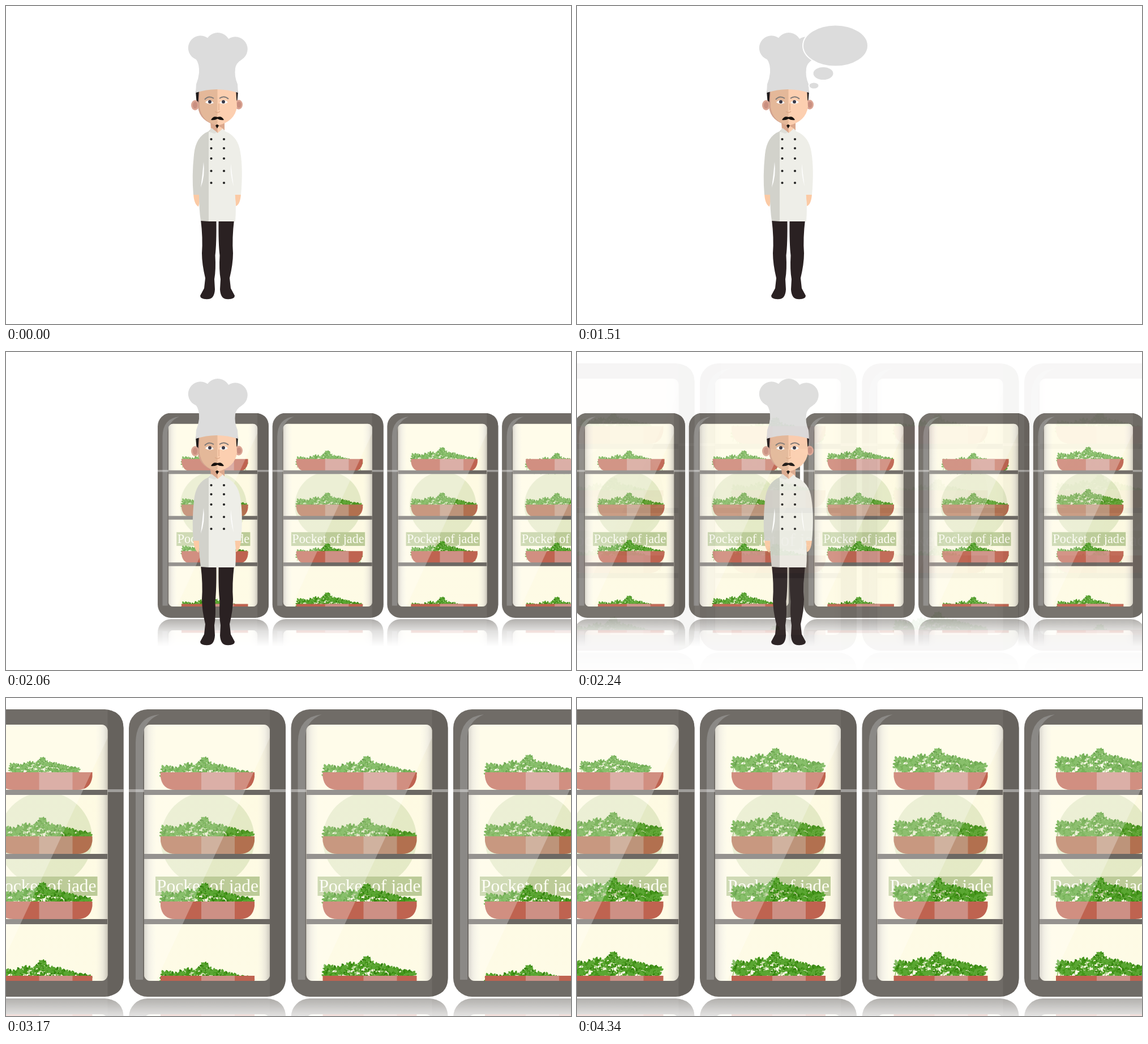
Write an HTML page that moves like this. It is 998 px wide and 561 px high and loops after 5.34 s.

```html
<!DOCTYPE html>
<html lang="en">
<head>
<meta charset="utf-8">
<title>Chef and growing cabinets</title>
<style>
@property --p { syntax: "<number>"; inherits: true; initial-value: 0; }
html, body { margin: 0; width: 100%; height: 100%; overflow: hidden; background: #fff; }
svg { display: block; width: 100vw; height: 100vh; }
.bubble, .dot, .slide, .near { animation: 5340ms linear infinite; }
.bubble { animation-name: bubble; }
.slide { animation-name: slide; }
.near { animation-name: fade, grow; }
.dot1 { animation-name: dot1; }
.dot2 { animation-name: dot2; }
.dot3 { animation-name: dot3; }
.plant { transform: translateY(max(0px, var(--d) - var(--d) * var(--p) * var(--s))); }
@keyframes bubble {
  0% { opacity: 0; animation-timing-function: step-end; }
  3.36% { opacity: 1; animation-timing-function: step-end; }
  30.7% { opacity: 1; animation-timing-function: steps(8); }
  35.195%, 100% { opacity: 0; }
}
@keyframes dot1 {
  0%, 15.72%, 28.265%, 100% { opacity: 0; animation-timing-function: step-end; }
  6.73%, 18.9% { opacity: 1; animation-timing-function: step-end; }
}
@keyframes dot2 {
  0%, 15.72%, 28.265%, 100% { opacity: 0; animation-timing-function: step-end; }
  8.415%, 21.335% { opacity: 1; animation-timing-function: step-end; }
}
@keyframes dot3 {
  0%, 15.72%, 28.265%, 100% { opacity: 0; animation-timing-function: step-end; }
  11.41%, 24.52% { opacity: 1; animation-timing-function: step-end; }
}
@keyframes slide {
  0% { transform: translateX(1100px); animation-timing-function: step-end; }
  31.262% { transform: translateX(977.5px); animation-timing-function: steps(18); }
  41.375%, 100% { transform: translateX(-5px); }
}
@keyframes fade {
  0%, 41.375% { opacity: 0; animation-timing-function: steps(17); }
  50.925%, 100% { opacity: 1; }
}
@keyframes grow {
  0%, 50.925% { --p: 0; animation-timing-function: steps(54); }
  81.262%, 100% { --p: 1; }
}
</style>
</head>
<body>
<svg viewBox="0 0 998 561" preserveAspectRatio="none">
  <defs>
    <linearGradient id="cream" x2="0" y2="1">
      <stop stop-color="#fefae1"/><stop offset="1" stop-color="#fefbe6"/>
    </linearGradient>
    <linearGradient id="edge">
      <stop stop-color="#b9b4ac" stop-opacity=".75"/>
      <stop offset=".035" stop-color="#dcd8d0" stop-opacity=".55"/>
      <stop offset=".1" stop-color="#f4f1e6" stop-opacity="0"/>
      <stop offset=".9" stop-color="#f4f1e6" stop-opacity="0"/>
      <stop offset=".965" stop-color="#dcd8d0" stop-opacity=".55"/>
      <stop offset="1" stop-color="#b9b4ac" stop-opacity=".75"/>
    </linearGradient>
    <linearGradient id="floor" gradientUnits="userSpaceOnUse" x1="0" y1="529" x2="0" y2="598">
      <stop stop-color="#fff" stop-opacity=".55"/>
      <stop offset=".45" stop-color="#fff" stop-opacity=".2"/>
      <stop offset="1" stop-color="#fff" stop-opacity="0"/>
    </linearGradient>
    <mask id="fadeout" maskUnits="userSpaceOnUse" x="-5" y="529" width="290" height="72">
      <rect x="-5" y="529" width="290" height="72" fill="url(#floor)"/>
    </mask>
    <clipPath id="inside"><rect x="27" y="47" width="222" height="452" rx="11"/></clipPath>

    <g id="case">
      <rect y="20" width="277" height="507" rx="33" fill="#706c67"/>
      <path d="M249 21Q277 25 277 53V494Q277 522 249 526Z" fill="#66625d"/>
      <path d="M12 497V78Q13 33 54 29Q27 40 25 68V497Z" fill="#8b8986"/>
      <rect x="27" y="47" width="222" height="452" rx="11" fill="url(#cream)"/>
      <rect x="27" y="47" width="222" height="452" rx="11" fill="url(#edge)"/>
    </g>
    <g id="pot">
      <path d="M0 0H166V8Q163 31 140 31H26Q3 31 0 8Z" fill="#bf6350"/>
      <path d="M72 0H131V31H72Z" fill="#cd9085"/>
    </g>
    <g id="sign">
      <circle cx="139" cy="249" r="83" fill="#7ea64c" opacity=".2"/>
      <rect x="47" y="315" width="184" height="34" fill="#bccb98"/>
      <text x="139" y="342" font-size="31.5" text-anchor="middle" fill="#fffef4"
        font-family="'Liberation Serif', serif">Pocket of jade</text>
    </g>
    <g id="glass">
      <path d="M27 162H249V171H27ZM27 275H249V284H27ZM27 390H249V399H27Z" fill="#6c6863"/>
      <path d="M27 47H249V70L48 499H27Z" fill="#fff" opacity=".28"/>
    </g>
    <g id="bush"></g>
  </defs>

  <rect width="998" height="561" fill="#fff"/>
  <g class="slide"><g id="far" transform="translate(0 93.24) scale(.7075 .713)"></g></g>

  <g id="chef">
    <path d="M344 377H371.500Q372 420 369.500 440Q371 465 368 482L369 500Q368 516 358 517Q343 518 343 511L350 498L352 480Q346 455 346 436Q348 410 344 377Z
      M375.500 377H403Q399 410 401 436Q401 455 395 480L397 498L404 511Q404 518 389 517Q379 516 378 500L379 482Q376 465 377.500 440Q375 420 375.500 377Z" fill="#2a2122"/>
    <path d="M331 331H342Q342 348 340 354Q332 350 331 331ZM404 331H415Q414 350 406 353Z" fill="#fbcaa5"/>
    <path d="M361 204H386V219L374 226L362 219Z" fill="#dba88d"/>
    <path d="M373 210L383 216L374 225Z" fill="#fccfb0"/>

    <path d="M363 216L374 224L383 216L387 221Q410 230 414 258Q419 288 415 333H404.500Q407 355 405 380H358V220Z" fill="#eeeee8"/>
    <path d="M363 216L358 221Q335 230 332 262Q328 300 331 333H341Q341 360 344 379L358 380V222L370 222Z" fill="#d2d2cb"/>
    <path d="M363 215L359 222L368 225L373 223Z" fill="#dfdfd9"/>
    <path d="M349 275Q352 300 344 320Q347 298 349 275ZM397 278Q396 298 402 318Q399 296 397 278Z" fill="#fff"/>
    <g id="buttons" fill="#222"></g>

    <path d="M335 150H342V172L337 174ZM404 150H410L408 174L404 172Z" fill="#1e1a1b"/>
    <ellipse cx="334" cy="175" rx="7" ry="9" fill="#dba594"/>
    <ellipse cx="411" cy="174" rx="7" ry="8.500" fill="#dba594"/>
    <ellipse cx="334" cy="175" rx="4" ry="6" fill="#c98f80"/>
    <ellipse cx="411.500" cy="174" rx="4" ry="5.500" fill="#c98f80"/>
    <path d="M341 146H374V211Q342 204 339 178Z" fill="#d3a38e"/>
    <path d="M342 146H374V211Q345 204 342 178Z" fill="#e4b899"/>
    <path d="M373.500 146H406L408 178Q404 204 373.500 211Z" fill="#fccfb0"/>
    <path d="M351 165Q358 157 367 163M377 163Q385 157 393 164" fill="none" stroke="#7f7a78" stroke-width="2"/>
    <path d="M352 170Q359 162 367 171Q359 175 352 170ZM377 171Q384 162 392 170Q385 175 377 171Z" fill="#fff"/>
    <g fill="#3b3a48"><circle cx="360" cy="169" r="3"/><circle cx="384" cy="169" r="3"/></g>
    <path d="M369 186Q373.500 190 378 186M376 172V184" fill="none" stroke="#dca988" stroke-width="1.200"/>
    <path d="M362 201Q366 193 373.500 196Q381 193 385 201Q378 202 373.500 199Q369 202 362 201Z
      M370 211Q373 207 376 211L373 216Z" fill="#17120f"/>

    <g fill="#dcdcdc">
      <circle cx="343.500" cy="74" r="21.700"/>
      <circle cx="374" cy="69" r="22"/>
      <circle cx="405" cy="76" r="21.700"/>
      <path d="M335 93Q342 102 341 118Q340 128 336 138L335 153Q372 141 410 153L409 138Q403 124 405 110Q406 101 417 94L405 60H343Z"/>
    </g>
  </g>

  <g class="bubble">
    <g fill="#dcdcdc" stroke="#fff" stroke-width="2">
      <ellipse cx="456.500" cy="70" rx="57.500" ry="36.500"/>
      <ellipse cx="435" cy="119" rx="18.500" ry="12"/>
      <ellipse cx="418.500" cy="140.500" rx="9" ry="6"/>
    </g>
    <g fill="#fff">
      <circle class="dot dot1" cx="426.500" cy="70" r="2.700"/>
      <circle class="dot dot2" cx="456" cy="70" r="2.700"/>
      <circle class="dot dot3" cx="485.500" cy="70" r="2.700"/>
    </g>
  </g>

  <g class="near" id="near"><rect width="998" height="561" fill="#fff"/></g>
</svg>
<script>
const $ = id => document.getElementById(id);
const PITCH = 286.5;
const POT_Y = [131, 244, 359, 490];

let seed = 11;
const rand = () => (seed = seed * 16807 % 2147483647) / 2147483647;

// Height of the foliage above the pot rim
const crown = x => Math.max(
  x < 78 ? 25 + x * .13 + 3 * Math.sin(x / 6) : 37 - (x - 78) * .24,
  44 * Math.exp(-(((x - 78) / 20) ** 2)));

const at = (x, y, a, n) => `${(x + n * Math.cos(a)).toFixed(1)} ${(y + n * Math.sin(a)).toFixed(1)}`;
const leaf = (x, y, a, n) =>
  `M${at(x, y, a, 0)}Q${at(x, y, a - .75, n * .8)} ${at(x, y, a, n)}Q${at(x, y, a + .75, n * .8)} ${at(x, y, a, 0)}`;

function drawBush() {
  const shades = ['#34820f', '#44961a', '#5aa632'];
  const leaves = ['', '', ''];
  let stems = '';
  const sprig = (x, h, n) => {
    const lean = (rand() - .5) * 1.2 - Math.PI / 2;
    stems += `M${x.toFixed(1)} ${(-h).toFixed(1)}l${(rand() * 4 - 2).toFixed(1)} 8`;
    for (const turn of [-1.1, 0, 1.1])
      leaves[Math.floor(rand() * 3)] += leaf(x, -h, lean + turn, n * (.8 + rand() * .4));
  };
  for (let i = 0; i < 110; i++) {
    const x = 4 + (i + rand()) * 157 / 110;
    sprig(x, (crown(x) - 7) * (rand() * 1.1 - .1), 7);
  }
  for (let x = 6; x < 160; x += 8) sprig(x, crown(x) - 8, 8);
  sprig(78, 35, 9);
  $('bush').innerHTML = `<path d="${stems}" stroke="#44961a" stroke-width=".9"/>`
    + leaves.map((d, i) => `<path d="${d}" fill="${shades[i]}"/>`).join('');
}

// plants: four pairs of [depth behind the pot, growing speed]
function cabinet(x, plants, dx, dy, smallTop) {
  const row = i => {
    const [d, s] = plants[i];
    const fit = smallTop && i === 0 ? 'translate(19 0) scale(.76 .7)' : '';
    return `<g transform="translate(${56 + dx} ${POT_Y[i] + dy})"><g transform="${fit}">
      <use href="#bush" class="plant" style="--d:${d}px;--s:${s}"/></g><use href="#pot"/></g>`;
  };
  return `<g transform="translate(${x} 0)">
    <g mask="url(#fadeout)"><g transform="translate(0 1057) scale(1 -1)">
      <use href="#case"/>
      <g clip-path="url(#inside)"><use href="#pot" x="${56 + dx}" y="${490 + dy}"/></g>
    </g></g>
    <use href="#case"/>
    <g clip-path="url(#inside)">
      ${row(0)}${row(1)}<use href="#sign"/>${row(2)}${row(3)}<use href="#glass"/>
    </g>
    <path d="M0 161H27V166H0ZM249 161H277V166H249Z" fill="#fff" opacity=".38"/>
  </g>`;
}

drawBush();

const farDepths = [
  [22, 13, 15, 22], [22, 13, 24, 14], [14, 13, 18, 25], [28, 14, 22, 25], [13, 4, 22, 21]];
$('far').innerHTML = farDepths.map((depths, i) =>
  cabinet(i * PITCH, depths.map(d => [d, 1]), 3.5, 2.8)).join('');

const nearPlants = [
  [[10, 2], [20, 2], [20, 2], [20, 1]],
  [[27, 1.53], [18, 2], [22, 2], [35, 1.7]],
  [[22, 1.31], [23, 2], [25, 2], [11, 1]],
  [[18, 1.3], [15, 2], [30, 2], [33, 1.04]]];
$('near').innerHTML += nearPlants.map((plants, i) =>
  cabinet(217 + (i - 1) * PITCH, plants, 0, 0, i === 0)).join('');

$('buttons').innerHTML = [235, 251, 269, 291, 312].map(y =>
  `<circle cx="362.500" cy="${y}" r="2.100"/><circle cx="385" cy="${y}" r="2.100"/>`).join('');
</script>
</body>
</html>
```
